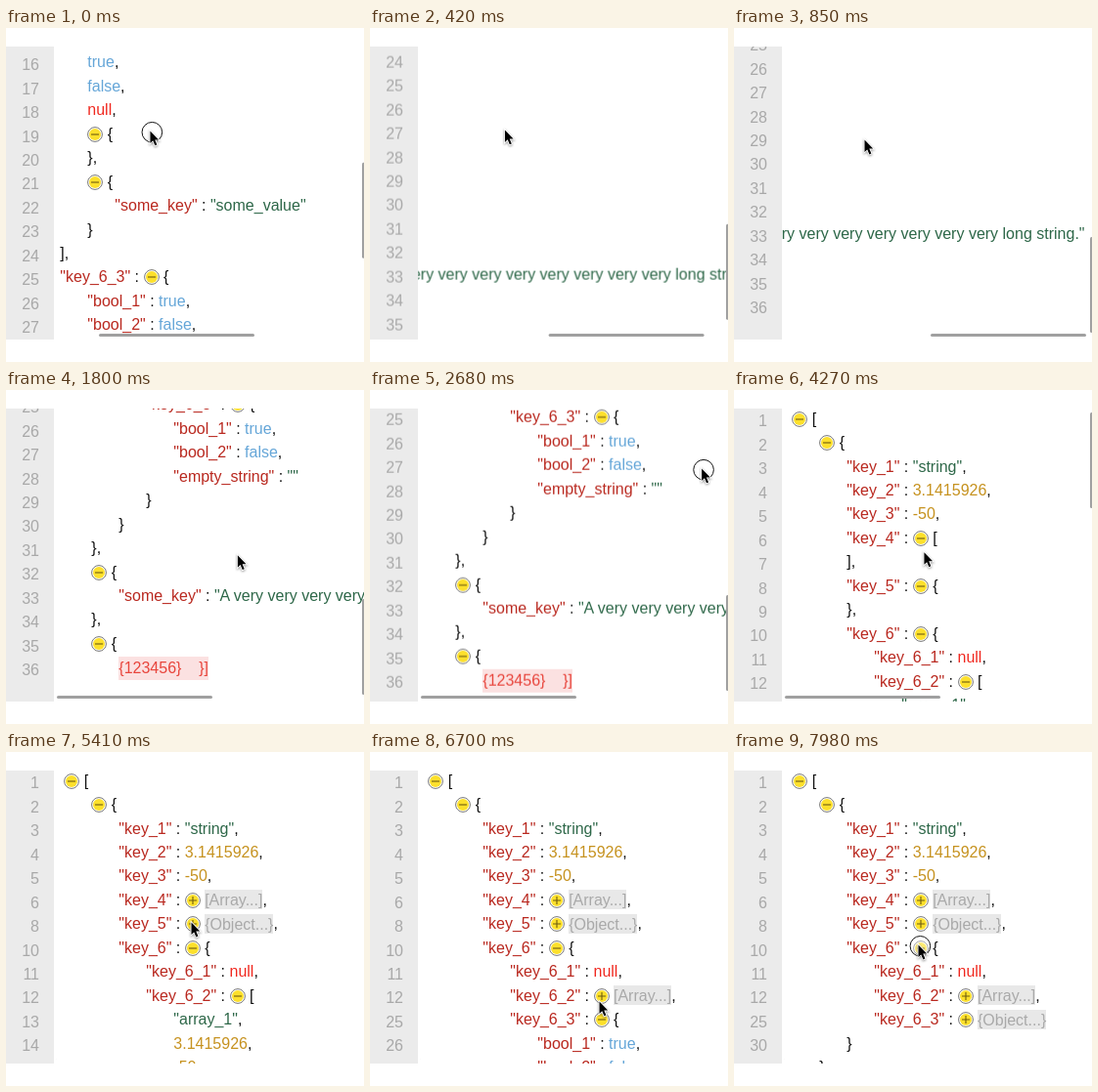
Write an HTML page that moves like this. It is 366x342 px and loops after 8 s.

```html
<!DOCTYPE html>
<html lang="en">
<head>
<meta charset="utf-8">
<title>JSON viewer</title>
<style>
  html, body { margin: 0; width: 100%; height: 100%; overflow: hidden; background: #fff; }
  body { position: relative; font: 16px "Liberation Sans", Arial, sans-serif; color: #111; }
  #view { position: absolute; left: 0; top: 19px; width: 366px; height: 300px; overflow: hidden; }
  #gutter, #pane { position: absolute; top: 0; height: 300px; overflow: hidden; }
  #gutter { left: 0; width: 49px; background: #ebebeb; color: #a8a8a8; }
  #pane { left: 49px; width: 317px; }
  #numbers, #code { position: absolute; left: 0; top: 0; will-change: transform; }
  #numbers { width: 34px; text-align: right; }
  .row { position: absolute; height: 24.45px; line-height: 24.45px; white-space: pre; }
  #numbers .row { right: 0; }
  .key { color: #b9281f; }
  .str { color: #2d6748; }
  .num { color: #c6921f; }
  .bool { color: #65a6d8; }
  .null { color: #f0281f; }
  .fold { color: #a9a9a9; background: #e8e8e8; padding: 1.5px 0; }
  .bad { color: #e8453c; background: #fbe1e1; padding: 2.5px 0 4.5px; }
  .icon { width: 16px; height: 16px; vertical-align: -3px; }
  .bar { position: absolute; background: #a0a0a0; border-radius: 1.5px; }
  #vbar { left: 364px; top: 4px; width: 3px; height: 98px; }
  #hbar { left: 52px; top: 294px; width: 159px; height: 3px; }
  #pointer { position: absolute; left: 0; top: 0; width: 366px; height: 342px; }
  #arrow { filter: drop-shadow(0 1px 1px rgba(0, 0, 0, .4)); }
</style>
</head>
<body>
<div id="view">
  <div id="gutter"><div id="numbers"></div></div>
  <div id="pane"><div id="code"></div></div>
  <div id="vbar" class="bar"></div>
  <div id="hbar" class="bar"></div>
</div>
<svg id="pointer" viewBox="0 0 366 342">
  <g id="mouse">
    <circle id="touch" cx="2.4" cy="1.8" r="10.3" fill="#fff" fill-opacity=".35" stroke="#111"/>
    <path id="arrow" d="M.5 .5V13L3.3 10.4L5.4 15.4L7.4 14.5L5.3 9.6H9.2Z" fill="#000" stroke="#fff" stroke-width="1.8" paint-order="stroke"/>
  </g>
</svg>
<script>
const LOOP = 8000, LINE = 24.45, INDENT = 28;
const $ = id => document.getElementById(id);

// Each line is an indent digit followed by its text; @ marks a fold button.
const longText = 'A ' + 'very '.repeat(10) + 'long string.';
const lines = `0@ [
1@ {
2"key_1" : "string",
2"key_2" : 3.1415926,
2"key_3" : -50,
2"key_4" : @ [
2],
2"key_5" : @ {
2},
2"key_6" : @ {
3"key_6_1" : null,
3"key_6_2" : @ [
4"array_1",
43.1415926,
4-50,
4true,
4false,
4null,
4@ {
4},
4@ {
5"some_key" : "some_value"
4}
3],
3"key_6_3" : @ {
4"bool_1" : true,
4"bool_2" : false,
4"empty_string" : ""
3}
2}
1},
1@ {
2"some_key" : "${longText}"
1},
1@ {
2!{123456}    }]`.split('\n');

const folds = [
  { first: 6, last: 7, at: 4560 },
  { first: 8, last: 9, at: 5270 },
  { first: 12, last: 24, at: 6480 },
  { first: 25, last: 29, at: 7290 }
];

const span = (kind, text) => `<span class="${kind}">${text}</span>`;
const icon = closed => `<svg class="icon" viewBox="-8 -8 16 16">
  <circle r="7.4" fill="#fff" stroke="#777"/><circle r="6" fill="#fde02c"/>
  <path d="M-4 0H4${closed ? 'M0 -4V4' : ''}" stroke="#6d5c10" stroke-width="1.1"/></svg>`;

function paint(text, fold) {
  if (text[0] === '!') return span('bad', text.slice(1));
  return text.replace(/"[^"]*"|-?\d[\d.]*|true|false|null|@ [[{]/g, (token, at) => {
    if (token[0] === '@') {
      if (!fold) return icon(false) + token.slice(1);
      const label = token[2] === '[' ? '[Array...]' : '{Object...}';
      return icon(true) + ' ' + span('fold', label) + lines[fold.last - 1].slice(2);
    }
    if (token[0] === '"') return span(text.startsWith(' :', at + token.length) ? 'key' : 'str', token);
    if (token === 'null') return span('null', token);
    return span(/[tf]/.test(token) ? 'bool' : 'num', token);
  });
}

function layout(closed) {
  let code = '', numbers = '', row = 0;
  for (let n = 1; n <= lines.length; n++) {
    const text = lines[n - 1], fold = closed.find(f => f.first === n);
    const top = row++ * LINE - 1.4;
    code += `<div class="row" style="left:${10.3 + text[0] * INDENT}px;top:${top}px">${paint(text.slice(1), fold)}</div>`;
    numbers += `<div class="row" style="top:${top + 2.8}px">${n}</div>`;
    if (fold) n = fold.last;
  }
  $('code').innerHTML = code;
  $('numbers').innerHTML = numbers;
}

const ease = {
  linear: p => p,
  in: p => p * p,
  out: p => 1 - (1 - p) ** 2,
  both: p => p * p * (3 - 2 * p)
};

// Keys are [time, x, y, easing into this key].
const scrollKeys = [
  [0, 88, 361], [30, 88, 361], [700, 305, 601, 'out'], [900, 305, 601],
  [1040, 255, 601, 'in'], [1510, 0, 601, 'out'], [2560, 0, 601],
  [3060, 0, 384, 'in'], [3160, 0, 286.5, 'linear'], [3420, 0, 0, 'out']
];
const mouseKeys = [
  [0, 147, 105], [120, 140, 98, 'linear'], [850, 133, 114, 'both'], [900, 133, 114],
  [1200, 203, 176, 'both'], [1660, 203, 176], [1800, 236, 169, 'in'], [2450, 344, 67, 'out'],
  [2560, 344, 67], [3060, 253, 287, 'in'], [3570, 253, 287], [3830, 213, 211, 'both'],
  [3980, 213, 211], [4270, 194, 166, 'linear'], [4400, 189, 151, 'out'], [4580, 189, 151],
  [4770, 190, 165, 'both'], [5100, 189, 174, 'both'], [5450, 189, 174], [5880, 198, 204, 'both'],
  [5960, 198, 204], [6180, 234, 248, 'both'], [6500, 234, 248], [7080, 234, 273, 'both'],
  [7320, 234, 273], [7890, 188, 197, 'both']
];
const presses = [[0, 120], [900, 1150], [2540, 3060], [4430, 4560], [5130, 5270], [6330, 6480], [7140, 7290], [7950, LOOP]];

function track(keys, t) {
  const next = keys.findIndex(k => k[0] > t);
  if (next < 0) return keys.at(-1).slice(1, 3);
  const [a, b] = [keys[next - 1], keys[next]];
  const p = ease[b[3] || 'linear']((t - a[0]) / (b[0] - a[0]));
  return [1, 2].map(i => a[i] + (b[i] - a[i]) * p);
}

let shown = -1;
function draw(t) {
  const closed = folds.filter(f => t >= f.at);
  if (closed.length !== shown) {
    shown = closed.length;
    layout(closed);
  }
  const [sx, sy] = track(scrollKeys, t), [mx, my] = track(mouseKeys, t);
  $('code').style.transform = `translate(${-sx}px, ${-sy}px)`;
  $('numbers').style.transform = `translateY(${-sy}px)`;
  $('hbar').style.transform = `translateX(${sx * 149 / 305}px)`;
  $('vbar').style.transform = `translateY(${sy * 191 / 601}px)`;
  const barOpacity = Math.max(0, Math.min(1, (4500 - t) / 180));
  $('hbar').style.opacity = $('vbar').style.opacity = barOpacity;
  $('mouse').setAttribute('transform', `translate(${mx} ${my})`);
  $('touch').style.display = presses.some(([a, b]) => t >= a && t < b) ? '' : 'none';
}

const start = performance.now();
function tick() {
  draw((performance.now() - start) % LOOP);
  requestAnimationFrame(tick);
}
tick();
</script>
</body>
</html>
```
